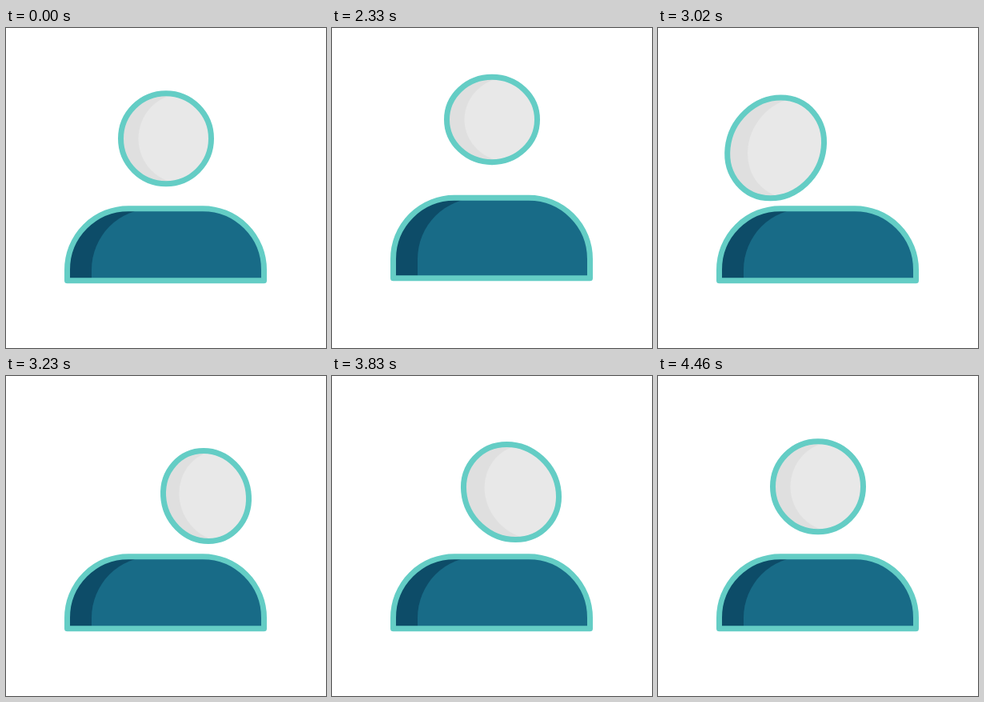
Animation of 400 by 400 pixels, one loop 4550 ms. Source, as an HTML page with a canvas:

```html
<!DOCTYPE html>
<html lang="en">
<head>
<meta charset="utf-8">
<title>Avatar</title>
<style>
  html, body { margin: 0; width: 100%; height: 100%; overflow: hidden; background: #fff; }
  canvas { display: block; width: 100vmin; height: 100vmin; }
</style>
</head>
<body>
<canvas id="stage" width="400" height="400"></canvas>
<script>
const ctx = document.getElementById('stage').getContext('2d');
const LOOP = 4550, STEP = 30, PHASE = 20;
const LINE = 7;
const COLORS = {
  line: '#64cdc5', skin: '#e8e8e8', skinShade: '#dfdfdf',
  shirt: '#186b87', shirtShade: '#0d4c68'
};

// x, y: head centre; rx, ry: outer half size; lean: sideways shift of the
// lowest point; shift: fill against outline; lift: rise of the shoulders.
const REST = { x: 200, y: 138.3, rx: 60, ry: 60, lean: 0, shift: 0, lift: 0 };
const LEFT = { x: 136, y: 150, rx: 56 };
const RIGHT = { x: 251, y: 150, rx: 55.5 };
const key = (time, pose = {}) => ({ ...REST, ...pose, time });

const keys = [
  key(0),
  key(2000),
  key(2030, { y: 121, ry: 58.5, lift: 5 }),
  key(2210, { y: 87.5, ry: 51.5, lift: 34 }),
  key(2420),
  key(2540, { x: 157, y: 149, rx: 57, lean: -3, shift: -3 }),
  key(2600, { x: 136, y: 150, rx: 54, shift: -5 }),
  key(2720, LEFT),
  key(2900, LEFT),
  key(3000, { x: 142, y: 151, rx: 64, ry: 67, lean: -7, shift: 2 }),
  key(3110, { rx: 62 }),
  key(3230, { x: 250, y: 150, rx: 57, lean: 3, shift: -1 }),
  key(3350, RIGHT),
  key(3530, RIGHT),
  key(3830, { x: 224, y: 145, rx: 63, ry: 63, lean: 5.5, shift: 3 }),
  key(3920, { y: 136 }),
  key(4050, { y: 90.5, ry: 51.5, lift: 32.5 }),
  key(4100, { y: 92, ry: 52, lift: 32 }),
  key(4460),
  key(LOOP)
];

// Monotone cubic interpolation: smooth, without overshoot.
function secant(i, name) {
  const a = keys[i], b = keys[i + 1];
  return a && b ? (b[name] - a[name]) / (b.time - a.time) : 0;
}

function slope(i, name) {
  const before = secant(i - 1, name), after = secant(i, name);
  return before * after > 0 ? 2 * before * after / (before + after) : 0;
}

function poseAt(time) {
  const i = keys.findIndex((k, n) => n + 1 < keys.length && time < keys[n + 1].time);
  const a = keys[i], b = keys[i + 1];
  const span = b.time - a.time;
  const p = (time - a.time) / span, q = 1 - p;
  const pose = {};
  for (const name in REST) {
    pose[name] = a[name] * q * q * (1 + 2 * p) + b[name] * p * p * (3 - 2 * p)
      + span * p * q * (q * slope(i, name) - p * slope(i + 1, name));
  }
  return pose;
}

function headPath(pose, offset) {
  const ry = pose.ry - LINE / 2;
  const rx = Math.sqrt((pose.rx - LINE / 2) ** 2 - pose.lean ** 2);
  ctx.save();
  ctx.transform(rx, 0, pose.lean, ry, pose.x + offset, pose.y);
  ctx.beginPath();
  ctx.arc(0, 0, 1, 0, Math.PI * 2);
  ctx.closePath();
  ctx.restore();
}

function bodyPath(pose, offset) {
  const left = 76.5 + offset, right = 322.5, radius = 76.5;
  const top = 225.7 - pose.lift, bottom = 315.7 - pose.lift * 0.22;
  ctx.beginPath();
  ctx.moveTo(left, bottom);
  ctx.arcTo(left, top, left + radius, top, radius);
  ctx.arcTo(right, top, right, top + radius, radius);
  ctx.lineTo(right, bottom);
  ctx.closePath();
}

function paintPart(path, pose, shift, lightOffset, shade, light) {
  ctx.save();
  path(pose, shift);
  ctx.fillStyle = shade;
  ctx.fill();
  ctx.clip();
  path(pose, shift + lightOffset);
  ctx.fillStyle = light;
  ctx.fill();
  ctx.restore();
  path(pose, 0);
  ctx.stroke();
}

function draw(now) {
  const time = now % LOOP;
  const frameTime = Math.max(0, Math.floor((time - PHASE) / STEP) * STEP + PHASE);
  const pose = poseAt(frameTime);
  ctx.fillStyle = '#fff';
  ctx.fillRect(0, 0, 400, 400);
  ctx.strokeStyle = COLORS.line;
  ctx.lineWidth = LINE;
  ctx.lineJoin = 'round';
  paintPart(bodyPath, pose, 0, 30.5, COLORS.shirtShade, COLORS.shirt);
  paintPart(headPath, pose, pose.shift, 22 * pose.rx / REST.rx, COLORS.skinShade, COLORS.skin);
}

const start = performance.now();
function tick() {
  draw(performance.now() - start);
  requestAnimationFrame(tick);
}
tick();
</script>
</body>
</html>
```
